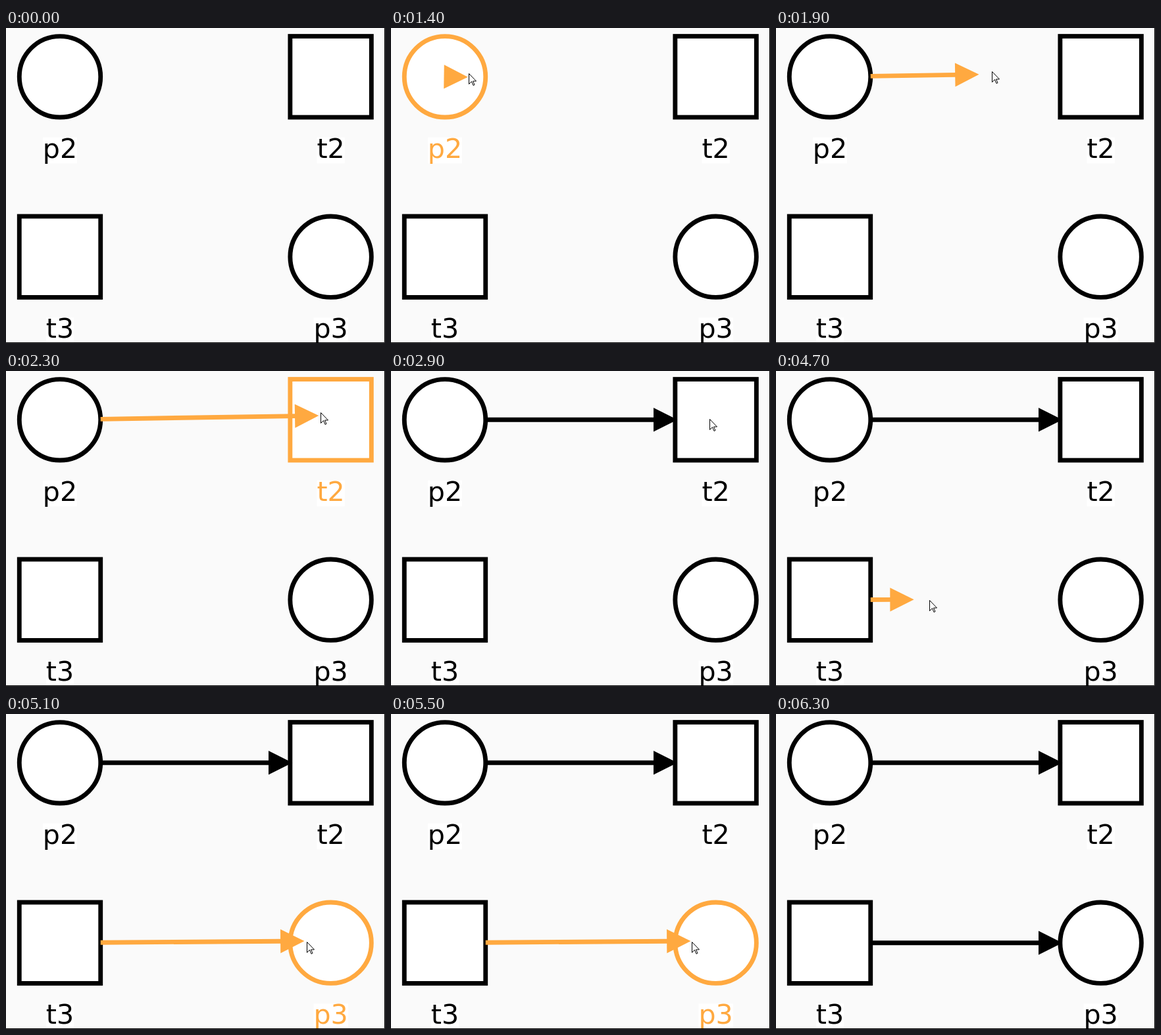
An HTML page for the animation above (7000 ms loop, 576 px wide and 480 px high).

```html
<!DOCTYPE html>
<html lang="en">
<head>
<meta charset="utf-8">
<title>Drawing arcs in a net</title>
<style>
  html, body { margin: 0; width: 100%; height: 100%; overflow: hidden; background: #fafafa; }
  svg { display: block; width: 100vw; height: 100vh; }
  text { font-family: "DejaVu Sans", sans-serif; text-anchor: middle; }
</style>
</head>
<body>
<svg id="stage" viewBox="0 0 576 480">
  <g id="nodes"></g>
  <g id="arcs"></g>
  <path d="M0 479.5H575.5V0" fill="none" stroke="#000"/>
  <path id="cursor" d="M.5 .5V16.5L4.5 12.5L7 18.5L9 17.5L6.5 12H11.5Z" fill="#fff" stroke="#000"/>
</svg>
<script>
const LOOP = 7000, STEP = 100, LAG = 30;
const BLACK = "#000", ORANGE = "#ffa940";

// Everything is laid out on a grid zoomed by ZOOM.
const ZOOM = 3.43;
const HALF = 18 * ZOOM, BORDER = 2 * ZOOM, FONT = 12 * ZOOM;
const LEFT = 82, RIGHT = LEFT + 120 * ZOOM;
const TOP = 74.3, BOTTOM = TOP + 80 * ZOOM;
const HEAD = 36.3, WING = 18.2;

const $ = id => document.getElementById(id);

function add(parent, tag, attrs = {}) {
  const el = document.createElementNS("http://www.w3.org/2000/svg", tag);
  for (const key in attrs) el.setAttribute(key, attrs[key]);
  return parent.appendChild(el);
}

function makeNode(name, x, y) {
  const layer = $("nodes");
  const style = { fill: "#fff", "stroke-width": BORDER };
  const shape = name[0] === "p"
    ? add(layer, "circle", { cx: x, cy: y, r: HALF, ...style })
    : add(layer, "rect", { x: x - HALF, y: y - HALF, width: 2 * HALF, height: 2 * HALF, ...style });
  const plate = add(layer, "rect", { y: y + 92.5, height: 39.5, fill: "#fff" });
  const label = add(layer, "text", { x, y: y + 123.7, "font-size": FONT });
  label.textContent = name;
  const width = label.getComputedTextLength();
  plate.setAttribute("x", x - width / 2);
  plate.setAttribute("width", width);
  return color => {
    shape.setAttribute("stroke", color);
    label.setAttribute("fill", color);
  };
}

function makeArc(y) {
  const g = add($("arcs"), "g");
  const line = add(g, "path", { "stroke-width": BORDER });
  const head = add(g, "path", { d: `M0 0L${-HEAD} ${-WING}V${WING}Z` });
  return (tip, color) => {
    g.setAttribute("visibility", tip ? "visible" : "hidden");
    if (!tip) return;
    // The arc aims from the node's centre and shows from its border on.
    const dx = tip.x - LEFT, dy = tip.y - y;
    const length = Math.hypot(dx, dy), neck = length - HEAD + 1;
    const angle = Math.atan2(dy, dx) * 180 / Math.PI;
    line.setAttribute("d", neck > HALF ? `M${HALF} 0H${neck}` : "");
    line.setAttribute("stroke", color);
    head.setAttribute("transform", `translate(${length})`);
    head.setAttribute("fill", color);
    g.setAttribute("transform", `translate(${LEFT} ${y}) rotate(${angle})`);
  };
}

const nodes = {
  p2: makeNode("p2", LEFT, TOP),
  t2: makeNode("t2", RIGHT, TOP),
  t3: makeNode("t3", LEFT, BOTTOM),
  p3: makeNode("p3", RIGHT, BOTTOM)
};

const drags = [
  { from: "p2", to: "t2", y: TOP, press: 1300, release: 2700, shift: 5 },
  { from: "t3", to: "p3", y: BOTTOM, press: 3800, release: 5700, shift: -1 }
];
for (const drag of drags) drag.draw = makeArc(drag.y);

const entry = { start: 700, leave: 6300, x: 172, y: 217 };
const moves = [
  { start: 700, end: 1400, x: 118, y: 69 },
  { start: 1400, end: 2300, x: 478, y: 63 },
  { start: 2300, end: 2600, x: 484, y: 73 },
  { start: 3200, end: 3800, x: 112, y: 350 },
  { start: 3900, end: 4450, x: 122, y: 350 },
  { start: 4450, end: 5100, x: 457, y: 347 }
];

function pointer(t) {
  let { x, y } = entry;
  for (const m of moves) {
    const u = Math.min(1, Math.max(0, (t - m.start) / (m.end - m.start)));
    const ease = u * u * (3 - 2 * u);
    x += (m.x - x) * ease;
    y += (m.y - y) * ease;
  }
  return { x, y };
}

function render(t) {
  const at = pointer(t), trail = pointer(t - LAG);
  const shown = t >= entry.start && t < entry.leave;
  $("cursor").setAttribute("transform", `translate(${Math.round(at.x)} ${Math.round(at.y)})`);
  $("cursor").setAttribute("visibility", shown ? "visible" : "hidden");

  for (const drag of drags) {
    const active = t >= drag.press && t < drag.release;
    const overFrom = active && at.x < LEFT + HALF;
    const overTo = active && at.x > RIGHT - HALF;
    nodes[drag.from](overFrom ? ORANGE : BLACK);
    nodes[drag.to](overTo ? ORANGE : BLACK);

    let tip = null;
    if (active) tip = { x: trail.x - 1.5, y: trail.y + drag.shift };
    else if (t >= drag.release) tip = { x: RIGHT - HALF + BORDER / 2, y: drag.y };
    drag.draw(tip, active ? ORANGE : BLACK);
  }
}

const begin = performance.now();
function tick() {
  const t = (performance.now() - begin) % LOOP;
  render(Math.floor(t / STEP) * STEP);
  requestAnimationFrame(tick);
}
tick();
</script>
</body>
</html>
```
